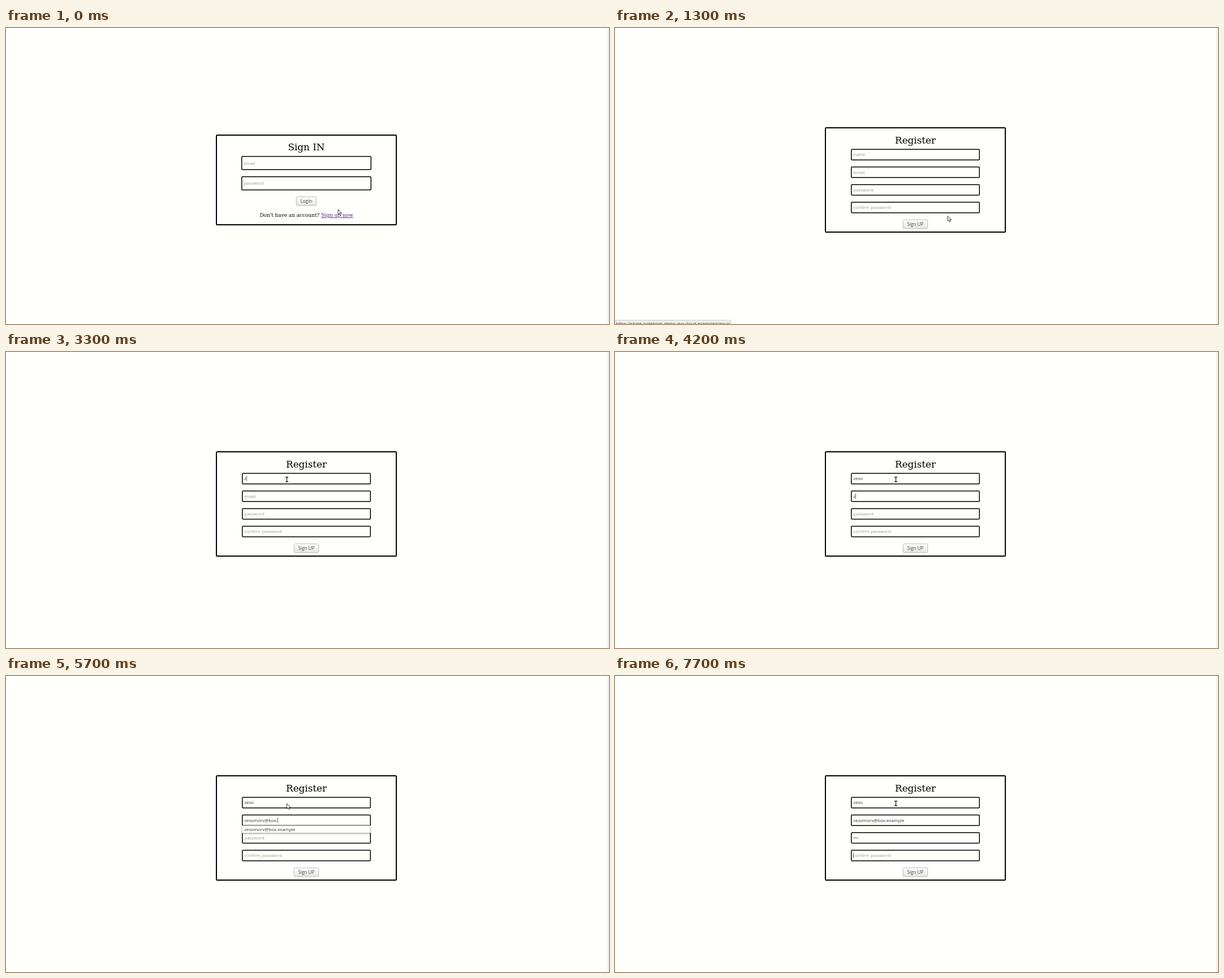
Animation of 1066 by 525 pixels, one loop 8 s. Source, as an HTML page:

```html
<!DOCTYPE html>
<html lang="en">
<head>
<meta charset="utf-8">
<title>Register form</title>
<style>
  html, body { margin: 0; width: 100%; height: 100%; overflow: hidden; background: #fffffb; }
  svg { display: block; }
  text { font: 7.9px "Open Sans", sans-serif; fill: #333; white-space: pre; }
  .title, .note { font-family: "DejaVu Serif", serif; fill: #000; text-anchor: middle; }
  .title { font-size: 16.8px; }
  .note { font-size: 8.95px; }
  .link { text-decoration: underline; fill: #551a8b; }
  .active { fill: #e00; }
  .hint { fill: #999; }
  .button { font-size: 8.1px; fill: #444; text-anchor: middle; }
  .status { font-size: 7.65px; fill: #444; }
  .frame { fill: none; stroke: #000; }
  .pointer { fill: #fff; stroke: #222; stroke-width: .9; stroke-linejoin: round; }
  .list { fill: #fffffd; stroke: #ccc; stroke-width: .6; filter: drop-shadow(0 1.5px 1.5px #0005); }
</style>
</head>
<body>
<svg width="1066" height="525" viewBox="0 0 1066 525">
  <defs>
    <linearGradient id="shade" x2="0" y2="1">
      <stop stop-color="#fff"/><stop offset="1" stop-color="#e6e6e4"/>
    </linearGradient>
  </defs>
  <rect x="1063" width="3" height="525" fill="#f0f0f2"/>
  <g id="scene"></g>
</svg>
<script>
const LOOP = 8000, STEP = 100;
const scene = document.getElementById('scene');
const ruler = document.createElement('canvas').getContext('2d');
ruler.font = '7.9px "Open Sans", sans-serif';

const NAME = 'zeso';
const EMAIL = 'zesomorv@box.example';
const URL_TEXT = 'https://share-notebook-demo-qvx.cloud.example/signup';
const NAME_LIST = ['zeso', 'zeso morv', 'zelda b', 'zeno'];
const EMAIL_LIST = ['morvzeso10@k.example', 'zeso@k.example', EMAIL,
  'morvzeso7@k.example', 'morvzeso8@k.example', 'morvzeso1@k.example'];
const FIELDS = [['name', 214.5], ['email', 245.8], ['password', 277], ['confirm password', 308.2]];

// [time, value] steps; values hold until the next step
const NAME_KEYS = [[0, 0], [3300, 1], [3400, 2], [3500, 3], [3600, 4]];
const EMAIL_KEYS = [[0, 0], [4200, 1], [4500, 3], [4600, 4], [4800, 5], [4900, 6], [5000, 8], [5100, 9],
  [5300, 10], [5500, 11], [5600, 12], [5700, 13], [5900, 14], [6100, 15], [6200, 16], [6400, 17],
  [6600, 18], [6700, 20]];
const PASS_KEYS = [[0, 0], [7300, 2], [7500, 3]];
const FOCUS = [[0, -1], [2100, 0], [3800, 1], [6800, 2], [7700, 3]];
const POINTER = [[0, 'arrow'], [100, 'hand'], [1200, 'arrow'], [1700, 'beam'], [3400, 'arrow'],
  [3800, 'beam'], [4500, 'arrow'], [6700, 'beam']];
const PATH = [[0, 587, 321.5], [300, 588, 329], [900, 588, 333], [1300, 588, 333],
  [1700, 496.5, 234], [1800, 496.5, 234], [2000, 496.5, 226]];

const held = (steps, t) => steps.filter(s => s[0] <= t).pop()[1];
const clamp = v => Math.max(0, Math.min(1, v));

function place(t) {
  const next = PATH.findIndex(p => p[0] > t);
  if (next < 0) return PATH[PATH.length - 1].slice(1);
  const [t0, x0, y0] = PATH[next - 1], [t1, x1, y1] = PATH[next];
  const k = (t - t0) / (t1 - t0), ease = k * k * (3 - 2 * k);
  return [x0 + (x1 - x0) * ease, y0 + (y1 - y0) * ease];
}

const text = (x, y, str, cls = '') => `<text x="${x}" y="${y}" class="${cls}">${str}</text>`;

const frame = (x, y, w, h, line) =>
  `<rect class="frame" x="${x + line / 2}" y="${y + line / 2}" width="${w - line}" height="${h - line}" rx="1.5" stroke-width="${line}"/>`;

const button = (y, w, label) =>
  `<rect x="${531 - w / 2}" y="${y}" width="${w}" height="15.5" rx="2" fill="url(#shade)" stroke="#aaa" stroke-width=".8"/>` +
  text(531, y + 10.7, label, 'button');

function dropdown(y, items) {
  if (!items.length) return '';
  const thumb = items.length > 5 ? `<rect x="640.4" y="${y + 1.5}" width="3" height="24.5" rx="1" fill="#d9835f"/>` : '';
  return `<rect class="list" x="417.6" y="${y}" width="226.2" height="${items.length * 11.15 + 1.8}"/>` + thumb +
    items.map((item, i) => text(421.3, y + 9.9 + i * 11.15, item)).join('');
}

function pointer(kind, [x, y]) {
  const shapes = {
    arrow: '<path class="pointer" d="M0 .5V9.3L2 7.5L3.6 10.8L5.2 10L3.7 6.9H6.6Z"/>',
    hand: '<path class="pointer" d="M-1 5.5V.8Q0-.6 1 .8V4L5.5 5Q6.5 5.4 6.2 7L5.4 10.5H0L-3 6.6Q-2.8 5.3-1 6.6Z"/>',
    beam: '<path d="M-2.5-4H-.6L0-3.5L.6-4H2.5M0-3.5V3.5M-2.5 4H-.6L0 3.5L.6 4H2.5" fill="none" stroke="#222" stroke-width="1.3"/>'
  };
  return `<g transform="translate(${x} ${y})">${shapes[kind]}</g>`;
}

function signIn(t) {
  const active = t >= 700 && t < 900 ? ' active' : '';
  return frame(371, 189, 320, 161, 2) + text(531, 217.3, 'Sign IN', 'title') +
    frame(416, 227, 230, 25, 1.5) + text(420.2, 242.7, 'email', 'hint') +
    frame(416, 263, 230, 25, 1.5) + text(420.2, 278.3, 'password', 'hint') +
    button(299.5, 35.5, 'Login') +
    text(531, 335, `Don't have an account? <tspan class="link${active}">Sign up now</tspan>`, 'note');
}

function register(t) {
  const name = NAME.slice(0, held(NAME_KEYS, t));
  const email = EMAIL.slice(0, held(EMAIL_KEYS, t));
  const values = [name, email, '•'.repeat(held(PASS_KEYS, t)), ''];
  const focus = held(FOCUS, t);
  let out = frame(371, 176, 320, 187, 2) + text(531, 204.5, 'Register', 'title');
  FIELDS.forEach(([hint, y], i) => {
    const value = values[i];
    out += frame(417, y, 228, 20.3, 1.5) + text(421.3, y + 12.7, value || hint, value ? '' : 'hint');
    if (i === focus) {
      const x = 421.2 + ruler.measureText(value).width;
      out += `<rect x="${x}" y="${y + 5.3}" width=".7" height="9.2" fill="#222"/>`;
    }
  });
  out += button(340.2, 43.5, 'Sign UP');
  if (t >= 3400 && t < 3800) out += dropdown(234.2, NAME_LIST.filter(n => n.startsWith(name)));
  if (t >= 4500 && t < 6700) out += dropdown(265.4, EMAIL_LIST.filter(e => e.includes(email)));
  return out;
}

function status(t) {
  const alpha = clamp((t - 100) / 200) * clamp((1500 - t) / 200);
  return `<g opacity="${alpha}"><path d="M-1 518.3H203Q205 518.3 205 520.3V527H-1Z" fill="#efefed" stroke="#bbb" stroke-width=".8"/>` +
    text(1.5, 526.6, URL_TEXT, 'status') + '</g>';
}

let shown = -1;
function tick(now) {
  const t = Math.floor(now % LOOP / STEP) * STEP;
  if (t !== shown) {
    shown = t;
    scene.innerHTML = (t < 1200 ? signIn(t) : register(t)) + status(t) + pointer(held(POINTER, t), place(t));
  }
  requestAnimationFrame(tick);
}
tick(0);
</script>
</body>
</html>
```
